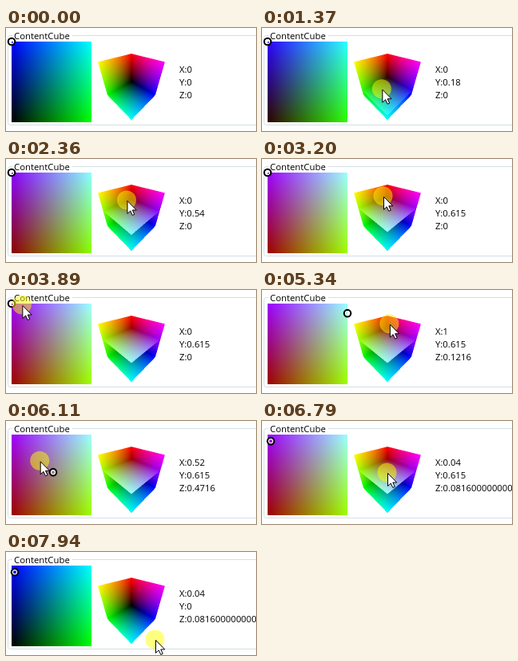
An HTML page with a canvas that plays this animation: 313 px wide and 129 px high, repeating every 8000 ms.

```html
<!DOCTYPE html>
<html>
<head>
<meta charset="utf-8">
<style>
  html, body { margin: 0; width: 100%; height: 100%; overflow: hidden; background: #fff; }
  svg, canvas, #plane { position: absolute; left: 0; top: 0; }
  #cube { left: 114px; top: 31px; width: 86px; height: 86px; }
  #plane {
    left: 7px; top: 17px; width: 100px; height: 101px;
    background-image: linear-gradient(90deg, #000, #0f0), linear-gradient(0deg, #000, #00f);
    background-blend-mode: screen;
  }
  text { font: 11.35px "Open Sans", "Noto Sans", sans-serif; fill: #000; }
</style>
</head>
<body>
<svg width="313" height="129">
  <rect x="2.5" y="9.5" width="320" height="112" rx="3" fill="none" stroke="#d5dfe5"/>
  <rect x="8" y="8" width="75" height="4" fill="#fff"/>
  <text x="10" y="14">ContentCube</text>
</svg>
<div id="plane"></div>
<canvas id="cube" width="172" height="172"></canvas>
<svg width="313" height="129">
  <text id="tx" x="217" y="56"></text>
  <text id="ty" x="217" y="72"></text>
  <text id="tz" x="217" y="88"></text>
  <g id="marker" fill="none">
    <circle r="4.2" stroke="#000" stroke-width="2.2"/>
    <circle r="2.6" stroke="#fff" stroke-width="1.2"/>
  </g>
  <g id="cursor">
    <circle cx="-.5" cy="-.5" r="12" fill="#ff0" fill-opacity=".5"/>
    <path d="M.5 .5V16.5L4.2 13L6.8 18.5L9.3 17.4L6.8 12H11.8Z" fill="#fff" stroke="#000"/>
  </g>
</svg>
<script>
const $ = id => document.getElementById(id);
const clamp = (v, lo, hi) => Math.min(hi, Math.max(lo, v));
const LOOP = 8000, ENTER = 130;

// Mouse path: time, x, y. Everything else follows from it.
const path = [
  [ENTER, 285, 112], [750, 148, 89.8], [900, 148, 89.8], [1900, 153, 62], [2360, 151.5, 52],
  [2660, 151, 43], [3200, 152, 46.8], [3350, 152, 46.8],
  [3950, 6, 16], [4430, 22, 48], [4570, 22, 41], [4850, 60, 15], [5240, 128, 29],
  [5340, 160, 42.5], [5650, 120, 112], [6300, 11, 25],
  [6790, 157, 65], [7020, 157, 65], [7940, 187, 110]
];

function mouse(t) {
  t = clamp(t, path[0][0], path.at(-1)[0]);
  const i = Math.max(1, path.findIndex(k => k[0] >= t));
  const [t0, x0, y0] = path[i - 1], [t1, x1, y1] = path[i];
  const u = (t - t0) / (t1 - t0);
  return [x0 + (x1 - x0) * u, y0 + (y1 - y0) * u];
}

// How far up the mouse is dragged from time a to b, as a share of the slider's travel
const TRAVEL = 70, STEP = .015;
const lift = (t, a, b) => (mouse(a)[1] - mouse(clamp(t, a, b))[1]) / TRAVEL;

function level(t) {
  const y = lift(t, 900, 3350) + lift(t, 7020, 7940);
  return Math.max(0, Math.round(y / STEP) * STEP);
}

// The marker trails the mouse while it is dragged over the square
const LAG = 100;
function pick(t) {
  const [x, y] = mouse(clamp(t - LAG, 3950, 6300));
  return [x - 7, y - 17].map(v => clamp(Math.round(v) / 100, 0, 1));
}

const ctx = $("cube").getContext("2d"), image = ctx.createImageData(172, 172);
const EYE = 1.5, FOCAL = 85.6;
const inside = v => v > -1e-6 && v < 1.000001;

// Point where a ray from the eye meets the plane p[axis] = value inside the unit cube
function hit(dir, axis, value) {
  const s = (value - EYE) / dir[axis];
  const p = dir.map(d => EYE + s * d);
  return s > 0 && p.every(inside) && p;
}

function drawCube(y) {
  const data = image.data;
  data.fill(0);
  for (let j = 0, o = 0; j < 172; j++) {
    for (let i = 0; i < 172; i++, o += 4) {
      const sx = (i + .5) / 2 - 43, sy = (j + .5) / 2 - 35.7;
      const fwd = -FOCAL / Math.sqrt(3), right = sx / Math.SQRT2, down = sy / Math.sqrt(6);
      const dir = [fwd - 2 * down, fwd + down - right, fwd + down + right];
      const p = hit(dir, 0, y) || hit(dir, 0, 0) || hit(dir, 1, 0) || hit(dir, 2, 0);
      if (!p) continue;
      for (let c = 0; c < 3; c++) data[o + c] = p[c] * 255;
      data[o + 3] = 255;
    }
  }
  ctx.putImageData(image, 0, 0);
}

const short = v => String(+v.toFixed(4));
const long = v => v > 0 && v < .1 ? v.toFixed(17) : short(v);
const move = (id, x, y) => $(id).setAttribute("transform", `translate(${x} ${y})`);
let drawn = -1;

function render(t) {
  const y = level(t);
  let [x, z] = pick(t);
  if (z > 0) z += .0016;
  if (y !== drawn) {
    drawCube(drawn = y);
    $("plane").style.backgroundColor = `rgb(${Math.round(y * 255)},0,0)`;
  }
  $("tx").textContent = "X:" + short(x);
  $("ty").textContent = "Y:" + long(y);
  $("tz").textContent = "Z:" + long(z);
  move("marker", 7 + x * 100, 17 + z * 100);
  move("cursor", ...mouse(t));
  $("cursor").style.display = t < ENTER ? "none" : "";
}

function frame() {
  render(performance.now() % LOOP);
  requestAnimationFrame(frame);
}
frame();
</script>
</body>
</html>
```
